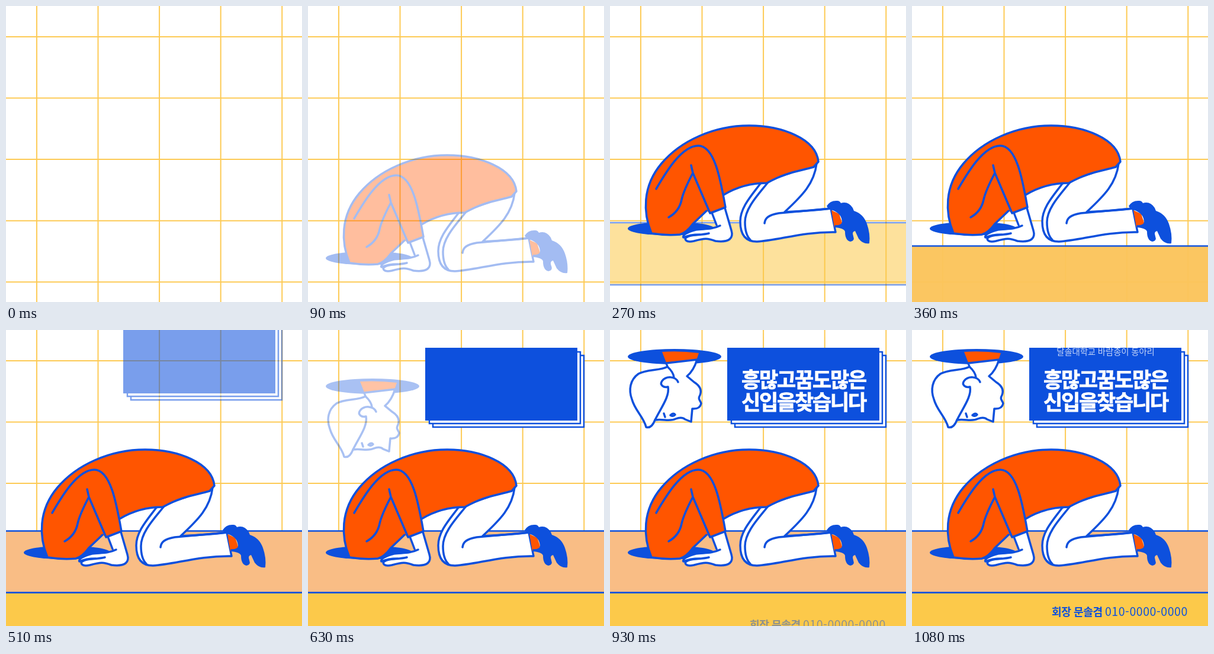
Animation of 500x500 px, one loop 1110 ms. Source, as an HTML page:

```html
<!DOCTYPE html>
<html lang="ko">
<head>
<meta charset="utf-8">
<style>
html, body { margin: 0; width: 100%; height: 100%; overflow: hidden; background: #fff; }
svg { display: block; width: 100vw; height: 100vh; }
text { font-family: "Noto Sans CJK KR", "Noto Sans CJK", sans-serif; }
.ink { fill: none; stroke: #0d50dd; stroke-width: 3.5; stroke-linecap: round; stroke-linejoin: round; }
.thin { stroke-width: 2.5; stroke-linejoin: miter; }
.white { fill: #fff; }
.red { fill: #ff5500; }
.blue { fill: #0d50dd; }
.title { font-size: 35px; font-weight: 900; letter-spacing: -2.2px; stroke: #fff; stroke-width: .8; }
</style>
</head>
<body>
<svg viewBox="0 0 500 500">
  <path id="grid" fill="none" stroke="#fdca55" stroke-width="2"/>

  <g id="floor">
    <rect x="-5" y="443.5" width="510" height="105" fill="#fcc94a"/>
    <path class="ink thin" d="M-5 443.5H505M-5 548.5H505"/>
  </g>

  <g id="mat">
    <rect x="-5" y="339.5" width="510" height="104" fill="#f9bd85"/>
    <path class="ink thin" d="M-5 339.5H505M-5 443.5H505"/>
  </g>

  <g id="body">
    <ellipse class="blue" cx="103" cy="376" rx="73" ry="11.5"/>
    <!-- legs -->
    <path class="ink white" d="M254 300C240 319 220 340 220 364C220 388 230 398 248 398C285 396 325 381 381 382L373 342Q340 346 295 348C325 320 345 300 349 266Z"/>
    <path class="ink" d="M266 299C250 319 228 342 228 365C228 380 231 389 237 395M373 342C340 345 310 348 285 350C268 353 262 358 261 367"/>
    <!-- foot -->
    <path class="red" d="M374 345L387 351L393 369L379 374Z"/>
    <path class="blue" d="M366 338Q372 328 384 329Q388 329 390 333Q402 329 410 341L412 346Q428 351 434 368Q440 385 438 401Q428 403 420 393L414 380Q408 381 411 389Q414 397 406 398Q397 396 397 381Q395 375 379 374L380 370Q392 371 392 364Q391 353 382 348Q376 344 370 344Z"/>
    <!-- sweater -->
    <path class="red" d="M70 384C56 350 54 305 87 266C119 228 175 202 235 202C290 202 348 224 352 263L344 272C315 280 297 281 265 299Q225 299 192 319L195 340L169 350L163 346L140 368Q129 383 118 386Z"/>
    <path class="ink" d="M70 384C56 350 54 305 87 266C119 228 175 202 235 202C290 202 348 224 352 263L344 272C315 280 297 281 265 299Q225 299 192 319M70 384Q95 388 118 386Q129 383 140 368L163 346"/>
    <!-- arm -->
    <path class="white" d="M172 349L180 370L186 371C172 378 158 376 145 378C130 382 122 387 124 391Q127 400 142 397C160 392 165 392 178 397C202 400 209 392 205 379L194 341Z"/>
    <path class="ink" d="M172 349L180 370M186 371C172 378 158 376 145 378C130 382 122 387 124 391Q135 386 152 386M167 384C152 388 132 385 127 393Q128 400 142 397C160 392 165 392 178 397C202 400 209 392 205 379L194 341"/>
    <path class="ink" d="M78 309C92 285 120 236 149 236C177 236 187 295 195 340L169 350L140 282L137 269M140 282C129 303 123 318 121 327Q117 347 99 357"/>
  </g>

  <g id="board">
    <rect class="ink white thin" x="211" y="43" width="255" height="121"/>
    <rect class="ink white thin" x="205" y="37" width="255" height="121"/>
    <rect class="blue" x="198" y="30" width="257" height="123"/>
  </g>

  <g id="head">
    <ellipse class="blue" cx="109" cy="45" rx="79" ry="13"/>
    <path class="red" d="M88 37Q118 35 150 39L146 51Q120 51 95 55Z"/>
    <path class="ink white" d="M95 56L97 62C85 69 62 66 48 74C34 84 31 101 37 117C42 136 57 147 61 164Q70 167 76 152C90 150 102 155 111 150Q121 146 127 151L137 155L139 133Q152 134 154 124C152 118 148 117 152 110C156 100 150 93 142 88L130 78C140 70 144 60 147 50Q120 53 95 56Z"/>
    <path class="ink" d="M97 62Q107 71 108 80M115 88C111 78 95 77 88 86C83 93 91 98 98 96C101 112 87 130 76 152"/>
    <path class="ink" d="M91 141L93 147M102 144Q107 139 110 143Q107 147 102 144"/>
  </g>

  <g id="title" class="white title">
    <text x="222" y="97">흥많고꿈도많은</text>
    <text x="222" y="135">신입을찾습니다</text>
  </g>

  <g id="contact" class="blue">
    <text x="236" y="483" font-size="18.2" font-weight="900" letter-spacing="-.5">회장 문솔겸</text>
    <text x="326" y="483" font-size="19.6" letter-spacing=".5">010-0000-0000</text>
  </g>

  <text id="club" class="white" x="327" y="54" font-size="14.5" letter-spacing="-.2" text-anchor="middle">달솔대학교 바람종이 동아리</text>
</svg>
<script>
const LOOP = 1110, STEP = 30;
const byId = id => document.getElementById(id);

let lines = "";
for (let i = 0; i < 5; i++) {
  const p = 51.9 + i * 103.6;
  lines += `M${p} 0V500M0 ${p}H500`;
}
byId("grid").setAttribute("d", lines);

// id, start ms, duration ms, starting y offset, fade speed
const parts = [
  ["body", 0, 240, 80, 1],
  ["floor", 150, 297, -130, 1.35],
  ["mat", 300, 205, 93, 1],
  ["board", 378, 240, -102, 1],
  ["head", 546, 240, 77, 1],
  ["title", 650, 200, -55, 1],
  ["contact", 820, 240, 40, 1],
  ["club", 900, 240, -50, 1]
].map(([id, ...motion]) => [byId(id), ...motion]);

function draw(time) {
  for (const [el, start, length, shift, fade] of parts) {
    const p = Math.min(1, Math.max(0, (time - start) / length));
    el.setAttribute("opacity", Math.min(1, p * fade));
    el.setAttribute("transform", `translate(0 ${shift * (1 - p)})`);
  }
}

const origin = performance.now();
function tick() {
  const time = (performance.now() - origin) % LOOP;
  draw(Math.floor(time / STEP) * STEP);
  requestAnimationFrame(tick);
}
tick();
</script>
</body>
</html>
```
